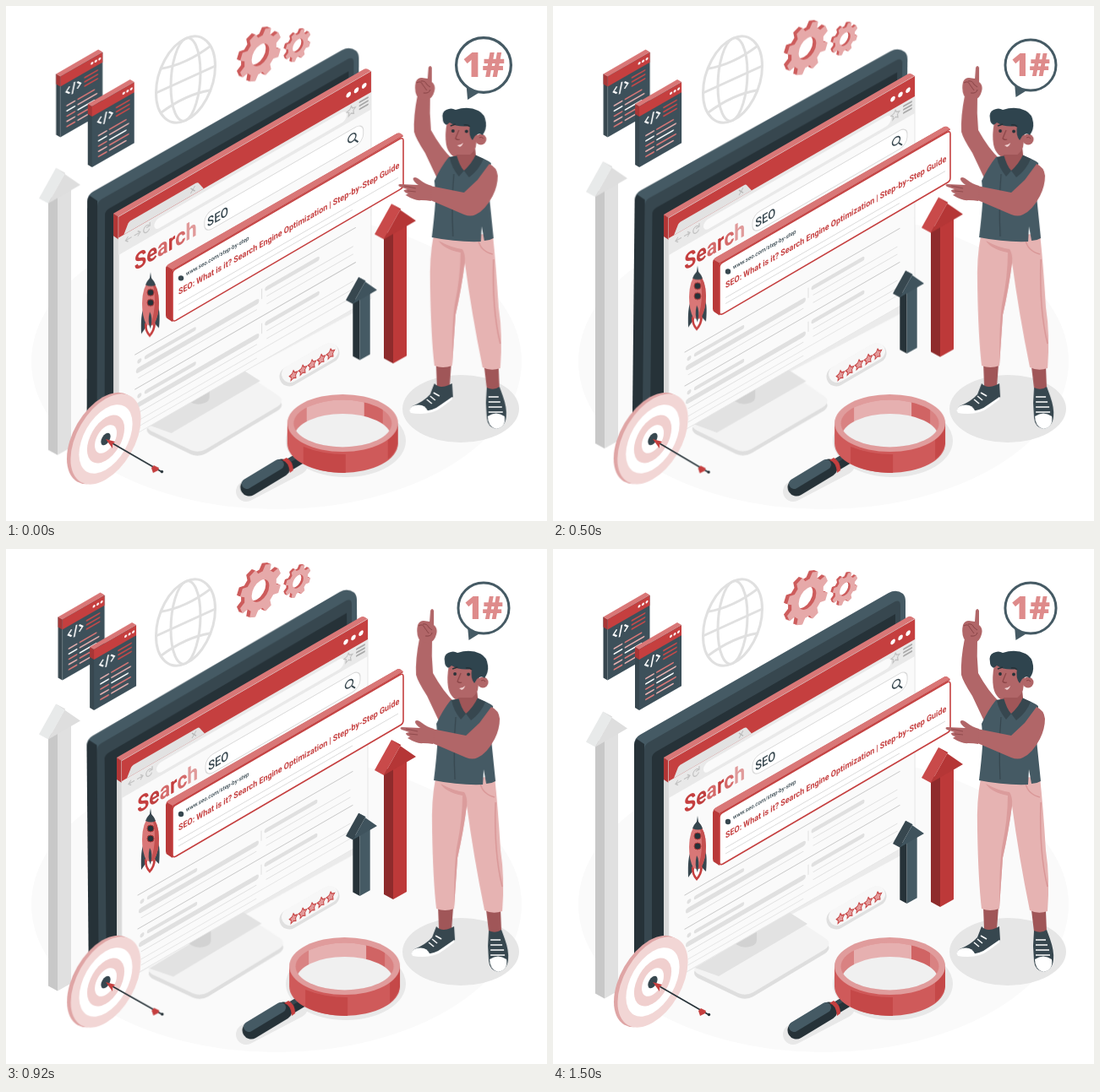
Animation of 640 by 610 pixels, one loop 1540 ms. Source, as an HTML page:

```html
<!DOCTYPE html>
<html lang="en">
<head>
<meta charset="utf-8">
<title>Search ranking</title>
<style>
html, body { margin: 0; width: 100%; height: 100%; overflow: hidden; background: #fff; }
svg { display: block; width: 100vw; height: 100vh; }
text { font-family: Roboto, Inter, sans-serif; }
.float, .beat, .wind, .shake { animation: 1540ms linear -40ms infinite; }
.float { animation-name: float; }
.beat { animation-name: beat; }
.wind { animation-name: wind; }
.shake { animation-name: shake; }
#page { --k: 1.1; transform-origin: 279.5px 298px; }
#bubble { --k: 1.3; transform-origin: 565px 70px; }
#monitor { transform-origin: 256px 292px; }
#target { transform-origin: 128px 512px; }
@keyframes float { 50% { transform: translateY(-12px); } }
@keyframes beat {
  0%, 30%, 40%, 60%, 100% { transform: scale(1); }
  10%, 50% { transform: scale(var(--k)); }
}
@keyframes wind {
  0%, 100% { transform: rotate(0deg); }
  25% { transform: rotate(1deg); }
  75% { transform: rotate(-1deg); }
}
@keyframes shake {
  0%, 100% { transform: translateX(0); }
  10%, 90% { transform: translateX(-1px); }
  20%, 80% { transform: translateX(2px); }
  30%, 50%, 70% { transform: translateX(-4px); }
  40%, 60% { transform: translateX(4px); }
}
</style>
</head>
<body>
<svg viewBox="0 0 640 610">
  <ellipse cx="320" cy="421" rx="290" ry="175" fill="#fafafa"/>
  <ellipse cx="538" cy="477" rx="69" ry="40" fill="#e6e6e6"/>
  <g fill="#e8e8e8" stroke="#e8e8e8" stroke-linecap="round">
    <path d="M284 575L345 543" stroke-width="24"/>
    <ellipse cx="402" cy="515" rx="71" ry="43" stroke="none"/>
  </g>

  <!-- globe -->
  <g transform="matrix(35 -16 0 48.5 212.5 87)" fill="none" stroke="#e0e0e0" stroke-width="3">
    <circle r="1" vector-effect="non-scaling-stroke"/>
    <ellipse rx=".5" ry="1" vector-effect="non-scaling-stroke"/>
    <path d="M-1 0H1M-.84 -.54Q0 -.36 .84 -.54M-.84 .54Q0 .36 .84 .54" vector-effect="non-scaling-stroke"/>
  </g>

  <g id="greyArrow" class="float"></g>
  <g id="gears" class="float"></g>
  <g id="code" class="shake"></g>

  <g id="monitor" class="wind">
    <path d="M96 232q0-8 7-12L397 52q9-5 17 1q3 3 3 9V350L96 515z" fill="#455a64"/>
    <path d="M96 232q0-4 3-7l9 6V510L96 515z" fill="#263238"/>
    <path d="M108 238q0-6 5-9L405 62q6-2 6 5V345L108 510z" fill="#37474f"/>
    <path d="M117 248q0-5 5-8L405 77V345L117 507z" fill="#263238"/>
    <path d="M108 510L417 332V360L108 527z" fill="#ebebeb"/>
    <path d="M171 491L268 437q9-5 18 0L322 461q9 6 0 13L237 525q-9 5-18 1L171 503q-8-6 0-12z" transform="translate(0 5)" fill="#dedede"/>
    <path d="M171 491L268 437q9-5 18 0L322 461q9 6 0 13L237 525q-9 5-18 1L171 503q-8-6 0-12z" fill="#f3f3f3"/>
    <path d="M168 496L279 430L301 444L196 506z" fill="#e2e2e2"/>
    <path d="M213 440H241V463q0 5-5 7q-10 4-18-1q-5-3-5-8z" fill="#d2d2d2"/>
  </g>

  <g id="page" class="beat">
    <path d="M131 247L137 251V513L131 510z" fill="#d9d9d9"/>
    <path d="M131 247L137 251V277L131 273z" fill="#b23636"/>
    <path d="M131 247L419 81q3-2 6 0l3 2L137 251z" fill="#d97777"/>
    <g id="front" transform="matrix(1 -.577 0 1 137 251)"></g>
  </g>

  <!-- rocket -->
  <g class="float">
    <path d="M163 358q-4 8-3 31l7-10M179 355q4 6 2 27l-6-6" fill="#37474f"/>
    <path d="M164 376q7 5 13 0q0 10-7 17q-7-7-6-17" fill="#c53f3f"/>
    <path d="M167 378h7q0 6-4 11q-4-5-3-11" fill="#fff"/>
    <path d="M171 322q-10 12-10 31q0 15 5 25q5 2 9 0q6-11 6-26q0-18-10-30z" fill="#d97777"/>
    <path d="M171 322q10 12 10 30q0 15-6 26l-4 1q5-15 5-30q0-14-5-27z" fill="#c55050"/>
    <path d="M171 316l1 7q3 3 5 8q-5 3-12 0q2-5 5-8z" fill="#37474f"/>
    <g fill="#263238" stroke="#a83636"><circle cx="171" cy="340" r="4"/><circle cx="171" cy="352" r="4"/></g>
    <path d="M170 363q4 5 1 20q-4-8-1-20" fill="#37474f"/>
  </g>

  <!-- rating -->
  <g stroke-linecap="round">
    <path d="M335 439L383 411" stroke="#e0e0e0" stroke-width="23"/>
    <path d="M336 436L383 409" stroke="#f7f7f7" stroke-width="20"/>
  </g>
  <g id="stars" fill="#e39a9a" stroke="#c53f3f" stroke-width="1.1"></g>

  <!-- result panel -->
  <g class="float">
    <path d="M189 312q0-3 3-5L462 152q3-2 5 0l3 3L197 314V375l-6-4q-2-1-2-4z" fill="#b93939"/>
    <path d="M190 309q1-2 3-3L462 152q3-2 5 0l3 2L197 313z" fill="#d97777"/>
    <path d="M197 318q0-4 4-6L466 158q4-2 4 2V212q0 4-4 6L201 373q-4 2-4-2z" fill="#fff" stroke="#c53f3f" stroke-width="1.6"/>
    <path d="M204 354L464 204M204 361L410 242" stroke="#dcdcdc"/>
    <circle cx="207" cy="323" r="3.2" fill="#37474f"/>
    <text transform="matrix(.866 -.5 0 1 213 320.5)" font-size="7" font-weight="500" fill="#37474f">www.seo.com/step-by-step</text>
    <text transform="matrix(.866 -.5 0 1 204 343)" font-size="10.3" font-weight="600" fill="#c53f3f">SEO: What is it? Search Engine Optimization | Step-by-Step Guide</text>
  </g>

  <g id="arrows" class="float"></g>

  <!-- target -->
  <g id="target" class="wind">
    <g id="rings"></g>
    <path d="M119 514L184 551.5" stroke="#263238" stroke-width="1.6"/>
    <path d="M118 513l11 3-3 3 0 5z" fill="#c53f3f"/>
    <path d="M172 547l3-3 6 3-1 3-6 3z" fill="#c53f3f"/>
    <circle cx="184.5" cy="551.5" r="1.7" fill="#263238"/>
  </g>

  <!-- magnifier -->
  <g class="shake">
    <path d="M288 570L326 547" stroke="#263238" stroke-width="21" stroke-linecap="round"/>
    <path d="M285 566L323 543" stroke="#455a64" stroke-width="12" stroke-linecap="round"/>
    <path d="M336 543L351 534" stroke="#263238" stroke-width="14"/>
    <path d="M334 539L349 530" stroke="#37474f" stroke-width="5"/>
    <path d="M327 538q8 2 9 15l4-3q0-11-8-15z" fill="#c53f3f"/>
    <path d="M333 494V518a65.5 35 0 0 0 131 0V494z" fill="#cf5a5a"/>
    <path d="M352 542V522q22 9 50 9V553q-30 0-50-11M452 537V510q9-6 12-16V518q-3 12-12 19" fill="#c54848"/>
    <ellipse cx="398.5" cy="494" rx="65.5" ry="34" fill="#e09c9c"/>
    <clipPath id="hole"><ellipse cx="398.5" cy="494.5" rx="58" ry="28"/></clipPath>
    <g clip-path="url(#hole)">
      <path d="M335 460H465V530H335z" fill="#d98282"/>
      <path d="M356 460H424V500H356z" fill="#e6b0b0"/>
      <path d="M424 460H446V500H424z" fill="#d06464"/>
      <ellipse cx="398.5" cy="510" rx="57" ry="27" fill="#f0f0f0"/>
      <path d="M345 508q20 17 58 15 35-2 47-14-10 17-50 18-42 0-55-19" fill="#fff"/>
    </g>
  </g>

  <!-- man -->
  <g class="shake" stroke-linejoin="round">
    <path d="M509 424h18l-2 27q-8 5-15-1zM566 428h17l1 25q-8 4-15 0z" fill="#a05658"/>
    <path d="M507 447q6 7 17 2l4-2 1 16q-6 4-11 9-8 8-20 9l-18 1q-4-3 1-8 14-6 21-14z" fill="#37474f"/>
    <path d="M481 474q14-5 19 7-10 2-20 1-5-3 1-8" fill="#fff"/>
    <path d="M478 480q24 3 37-8l13-9v3l-12 9q-14 11-37 7z" fill="#fff"/>
    <path d="M498 466l6 5M502 462l6 5M506 458l7 4" stroke="#fff" stroke-width="1.5"/>
    <path d="M569 452q8 4 15-1l4 11q5 14 4 24-1 13-12 15-10-2-11-13l-1-18z" fill="#37474f"/>
    <path d="M570 486q10-7 20 0 2 13-10 15-10-3-10-15" fill="#fff"/>
    <path d="M571 463h12M571 469h14M571 475h16M571 481h17" stroke="#fff" stroke-width="1.5"/>
    <path d="M506 272q-5 25-4 60 1 60 5 94 10 4 21 0l4-60q7-30 11-62 8 60 21 124 10 5 21 1 3-40-2-72-3-50-7-87z" fill="#e6b3b2"/>
    <path d="M512 278q14 8 28 10 4 6 3 16-4 30-11 62l-4 58q0-50 3-70 7-34 7-62-20-4-26-14" fill="#db9c9c"/>
    <path d="M577 300q-2 60 8 100M559 277q2 13 17 17" fill="none" stroke="#d99797" stroke-width="1.5"/>

    <g fill="#b16668">
      <path d="M487 106q-5 25-4 43 2 8 13 25l16 34 17-26q-14-13-26-35-2-20-1-41z"/>
      <path d="M485 90q2-5 7-5l7 1 1-13q2-4 4 0l0 17q5 4 3 11-2 8-8 10-9 1-13-5-3-7-1-16z"/>
      <path d="M537 166h18l2 20-18 13-8-16z" fill="#a05658"/>
      <path d="M522 137q-3 16-1 27 3 15 17 17 14-3 18-14l4-30q-20-10-38 0z"/>
      <circle cx="562" cy="158" r="6.5"/>
    </g>
    <path d="M486 91q5-3 7 2l5 7M491 89q5-1 7 4l4 3M494 103q7 1 8-4" fill="none" stroke="#8a4547"/>
    <path d="M517 134q-2-8 4-11 6-3 11 0 15-5 27 1 8 4 9 14 1 8-4 15-4-4-9 1l-3 5q-5-6-3-17-15 2-24-4-4 4-5 2-3-2-3-6z" fill="#2f444e"/>
    <path d="M526 142l6-2M542 141q4-1 7 2" stroke="#263238" stroke-width="1.5" fill="none"/>
    <g fill="#263238"><circle cx="529" cy="148" r="1.9"/><circle cx="545" cy="148.5" r="1.9"/></g>
    <path d="M536 147q-3 7-4 10 2 2 5 1" fill="none" stroke="#8a4547" stroke-width="1.2"/>
    <path d="M534 165q4 0 7-3-1 4-4 5z" fill="#f0d0d0"/>
    <path d="M560 156q3-2 5 1" fill="none" stroke="#8a4547"/>

    <path d="M524 179l12-1 9 6 10-7q13 4 19 9l-2 40 5 49q-5 3-11 3l-3-17-1 18q-28 1-58-5 3-25 4-40 0-20-1-27 8-17 17-28z" fill="#455a64"/>
    <path d="M525 179l10-2q2 10 8 17 8-10 12-18l10 5q-5 13-17 22l-6-8-6 7q-9-11-11-23z" fill="#37474f"/>
    <path d="M533 176q4 14 9 19 9-8 14-19z" fill="#a05658"/>
    <path d="M530 199q-3 36-1 74" fill="none" stroke="#37474f" stroke-width="1.2"/>
    <path d="M572 187q9 4 10 14 0 12-6 24-9 17-20 22-6 3-14 0l-42-18-3-17 45 9 16-15z" fill="#b16668"/>
    <path d="M504 213q-8-2-14-7-6-5-8-2-1 3 6 8l-22-1q-3 1 0 3l9 3-4 1q0 3 5 4l-3 2q11 7 18 6 7 0 12 1z" fill="#b16668"/>
    <path d="M471 213l14 3M475 219l10 1" stroke="#8a4547" stroke-width=".8"/>
  </g>

  <g id="bubble" class="beat">
    <path d="M546 91L547.5 108L562 99z" fill="#455a64"/>
    <circle cx="565" cy="70" r="30" fill="#fff" stroke="#455a64" stroke-width="3"/>
    <text x="565" y="83" text-anchor="middle" font-size="37" font-weight="800" fill="#de8b8b" style="font-family:'Open Sans','Noto Sans',sans-serif">1#</text>
  </g>
</svg>
<script>
const put = (id, parts) => document.getElementById(id).innerHTML = [].concat(parts).join('');
const poly = (pts, fill) => `<path d="M${pts}z" fill="${fill}"/>`;
const line = (x1, x2, y, color, w) =>
  `<path d="M${x1} ${y}H${x2}" stroke="${color}" stroke-width="${w}" stroke-linecap="round"/>`;
const iso = (x, y) => `matrix(.866 -.5 0 1 ${x} ${y})`;

// Upright 3D arrow: x, y is the left barb, h the shaft length below it.
function arrow(x, y, k, h, [slope, face, side, shaft]) {
  return `<g transform="translate(${x} ${y}) scale(${k})">` +
    poly(`11 0L22 -4V${h}L11 ${h - 6}`, side) +
    poly(`22 -4L38 -12V${h - 9}L22 ${h}`, shaft) +
    poly('0 0L20 -36L31 -30L11 6', slope) +
    poly('11 6L31 -30L20 -36L49 -16', face) + '</g>';
}
put('greyArrow', arrow(39, 228.5, 1, 304, ['#e8eaea', '#dedede', '#c8c8c8', '#e0e0e0']));
put('arrows', [
  arrow(402, 349, .755, 94, ['#37474f', '#3f535d', '#263238', '#455a64']),
  arrow(436, 271, 1, 153, ['#c94a4a', '#b53636', '#8e2b2c', '#bd3939'])
]);

function gear(x, y, r) {
  const n = 8, pts = [];
  for (let i = 0; i < n; i++)
    for (const [o, q] of [[-.32, .77], [-.19, 1], [.19, 1], [.32, .77]]) {
      const a = (i + o + .5) * 2 * Math.PI / n;
      pts.push((r * q * Math.cos(a)).toFixed(2) + ' ' + (r * q * Math.sin(a)).toFixed(2));
    }
  const b = r * .42;
  const d = `M${pts.join('L')}zM${b} 0A${b} ${b} 0 1 0 ${-b} 0A${b} ${b} 0 1 0 ${b} 0z`;
  const copy = (s, fill) =>
    `<path transform="${iso(x - s, y - s * .4)}" d="${d}" fill="${fill}" fill-rule="evenodd"/>`;
  const depth = r / 7;
  return [4, 3, 2, 1].map(i => copy(depth * i / 4, '#cd5c5c')).join('') + copy(0, '#e6a9a9');
}
put('gears', [gear(301, 58.5, 28.5), gear(345.5, 47.5, 17.5)]);

function codeWindow(x, y) {
  const tones = ['#d97777', '#e6b0b0', '#fff', '#d97777', '#e6b0b0'];
  const rows = tones.map((c, i) =>
    line(8, 17, 39 + i * 6.2, tones[(i + 1) % 5], 1.8) + line(21, i % 2 ? 43 : 40, 39 + i * 6.2, c, 1.8));
  return `<g transform="translate(${x} ${y})">` +
    poly('-5 -3L0 0V72L-5 69', '#37474f') + poly('-5 -3L0 0V12L-5 9', '#a83636') +
    poly('-5 -3L45 -32L50 -29L0 0', '#d97777') +
    '<g transform="matrix(1 -.577 0 1 0 0)"><path d="M0 0H50V72H0z" fill="#3d505a"/>' +
    '<path d="M0 0H50V12H0z" fill="#c53f3f"/>' +
    [37.5, 42, 46.5].map(u => `<circle cx="${u}" cy="6" r="1.5" fill="#fff"/>`).join('') +
    '<path d="M11 18L7 22L11 26M17 16L14 29M20 18L24 22L20 26" fill="none" stroke="#fff" stroke-width="1.8"/>' +
    [18, 23, 28].map(v => line(29, 44, v, '#c54a4a', 1.8)).join('') + rows.join('') + '</g></g>';
}
put('code', [codeWindow(64.5, 83.5), codeWindow(102, 119)]);

const word = [...'Search'].map((ch, i) =>
  `<tspan fill="${['#c53f3f', '#c04040', '#d46a6a', '#c53f3f', '#d46a6a', '#e09a9a'][i]}">${ch}</tspan>`).join('');
const listing = v =>
  line(19, 273, v, '#c7c7c7', 1) +
  `<circle cx="24" cy="${v + 10}" r="2.5" fill="#e0e0e0"/>` +
  line(32, 87, v + 10, '#e0e0e0', 4.5) + line(171, 229, v + 11, '#e0e0e0', 5) +
  line(23, 159, v + 20, '#e0e0e0', 6) + line(171, 270, v + 20, '#e0e0e0', 1) +
  line(23, 159, v + 29, '#e0e0e0', 1) + line(171, 270, v + 29, '#e0e0e0', 1) +
  `<path d="M165 ${v + 8}v12" stroke="#e0e0e0"/>`;
put('front', [
  '<path d="M0 0H291V262H0z" fill="#fafafa" stroke="#e6e6e6"/>',
  '<path d="M0 24H291V44H0z" fill="#e9e9e9"/><path d="M0 0H291V24H0z" fill="#c53f3f"/>',
  '<path d="M6 24L11 14Q12 12.5 14 12.5H89Q91 12.5 92 14L98 24z" fill="#e2e2e2"/>',
  '<path d="M83 15L88 21M88 15L83 21" stroke="#b5b5b5"/>',
  [265, 274, 283].map(u => `<circle cx="${u}" cy="12" r="2.8" fill="#fff"/>`).join(''),
  '<rect x="41" y="28" width="222" height="12" rx="6" fill="#fafafa"/>',
  '<g fill="none" stroke="#c2c2c2" stroke-width="1.2"><path d="M15 32H8M11 29L8 32L11 35M18 32H25M22 29L25 32L22 35M35 30A3.5 4 0 1 0 35.5 34M36 27V31H32"/>',
  '<path d="M268 27l1.5 3 3.5 1-2.5 2 .5 4-3-2-3 2 .5-4-2.5-2 3.5-1z"/></g>',
  [28, 32, 36].map(v => line(278, 287, v, '#a8a8a8', 2)).join(''),
  '<rect x="99" y="54" width="183" height="22" rx="9" fill="#fff" stroke="#d9d9d9"/>',
  '<circle cx="269" cy="64" r="4.5" fill="none" stroke="#37474f" stroke-width="1.4"/><path d="M272 68L276 73" stroke="#37474f" stroke-width="1.6"/>',
  '<g transform="scale(.866 1)"><text x="118" y="71" font-size="15" font-weight="500" fill="#37474f">SEO</text>',
  `<text x="21" y="73" font-size="26.5" font-weight="700">${word}</text></g>`,
  listing(170), listing(210),
  line(23, 273, 248, '#e6e6e6', 1), line(23, 159, 255, '#e6e6e6', 1)
]);

const star = [...Array(10)].map((_, i) => {
  const r = i % 2 ? 3.2 : 5.8, a = i * Math.PI / 5;
  return (r * Math.sin(a)).toFixed(2) + ' ' + (-r * Math.cos(a)).toFixed(2);
}).join('L');
put('stars', [0, 1, 2, 3, 4].map(i =>
  `<path transform="${iso(340 + i * 11, 437.5 - i * 6.4)}" d="M${star}z"/>`));

const disc = (x, y, r, fill) => `<circle transform="${iso(x, y)}" r="${r}" fill="${fill}"/>`;
put('rings', [
  disc(114, 512, 48.5, '#dfa5a5'),
  ...[[48, '#f2d6d5'], [36.5, '#fff'], [25.5, '#f0cfce'], [15, '#fff'], [6.5, '#37474f']]
    .map(([r, c]) => disc(118, 513, r, c))
]);
</script>
</body>
</html>
```
